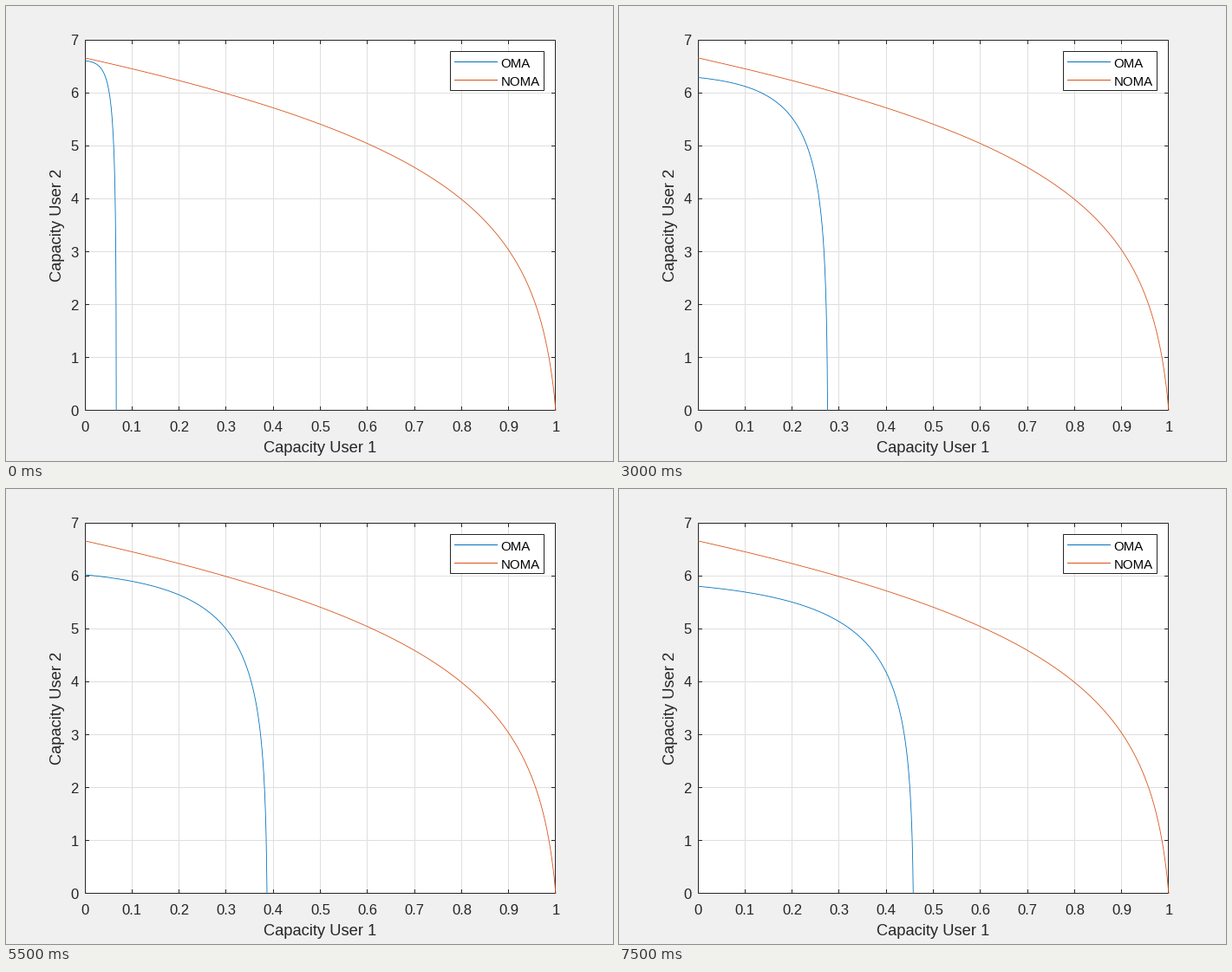
A matplotlib script that plays this animation: 700x525 px, repeating every 8000 ms.

```python
import matplotlib.pyplot as plt
import numpy as np
from matplotlib.animation import FuncAnimation
from matplotlib.patches import Rectangle

W, H, DPI = 700, 525, 100
FRAMES, INTERVAL = 16, 500
PX = 72 / DPI
INK, GRID, BLUE, ORANGE = "#262626", "#dfdfdf", "#0072bd", "#d95319"
LEFT, TOP, RIGHT, BOTTOM = 91, 39, 634, 467  # plot area in pixels
TICK = 5
G1, G2 = 1, 100  # channel gains of the two users

plt.rcParams["font.family"] = "Liberation Sans"
fig = plt.figure(figsize=(W / DPI, H / DPI), dpi=DPI, facecolor="#f0f0f0")
ax = fig.add_axes([0, 0, 1, 1])
ax.set(xlim=(0, W), ylim=(H, 0))
ax.axis("off")


def to_x(c):
    return LEFT + (RIGHT - LEFT) * c


def to_y(c):
    return BOTTOM - (BOTTOM - TOP) * c / 7


def pixel(v, last):
    """Centre of the pixel holding v, kept inside the plot area."""
    return min(np.floor(v), last - 1) + 0.5


def line(xs, ys, color=INK, z=3, width=1, **kw):
    return ax.plot(xs, ys, color=color, lw=width * PX, zorder=z, snap=False,
                   solid_capstyle="butt", **kw)[0]


def curve(xs, ys, color, z):
    return line(xs, ys, color, z, width=0.833)


def box(x0, y0, x1, y1, z):
    """White box with a one-pixel border inside the given edges."""
    ax.add_patch(Rectangle((x0 + 0.5, y0 + 0.5), x1 - x0 - 1, y1 - y0 - 1,
                           fc="white", ec=INK, lw=PX, zorder=z, snap=False,
                           joinstyle="miter"))


def text(x, y, s, px, color=INK, ha="center", **kw):
    ax.text(x, y, s, fontsize=px * PX, color=color, ha=ha, va="baseline",
            zorder=9, **kw)


def oma(alpha):
    b = np.linspace(0, 1, 1001)
    c1 = alpha * np.log2(1 + (1 - b) * G1 / alpha)
    c2 = (1 - alpha) * np.log2(1 + b * G2 / (1 - alpha))
    return to_x(c1), to_y(c2)


def noma():
    b = np.linspace(0, 1, 1001)
    c1 = np.log2(1 + (1 - b) * G1 / (b * G1 + 1))
    c2 = np.log2(1 + b * G2)
    return to_x(c1), to_y(c2)


box(LEFT, TOP, RIGHT, BOTTOM, 1)

for k in range(11):
    x = pixel(to_x(k / 10), RIGHT)
    if 0 < k < 10:
        line([x, x], [TOP + 1, BOTTOM - 1], GRID, 2)
        line([x, x], [BOTTOM, BOTTOM - TICK])
        line([x, x], [TOP, TOP + TICK])
    text(to_x(k / 10), 491, f"{k / 10:g}", 16.67)
for k in range(8):
    y = pixel(to_y(k), BOTTOM)
    if 0 < k < 7:
        line([LEFT + 1, RIGHT - 1], [y, y], GRID, 2)
        line([LEFT, LEFT + TICK], [y, y])
        line([RIGHT, RIGHT - TICK], [y, y])
    text(83.5, to_y(k) + 6, str(k), 16.67, ha="right")

text(362.5, 515, "Capacity User 1", 18.33)
text(64.5, 252.8, "Capacity User 2", 18.33, rotation=90,
     rotation_mode="anchor")

region = curve([], [], BLUE, 4)
curve(*noma(), ORANGE, 5)

box(512, 52, 621, 98, 6)
for y, name, color in ((64.5, "OMA", BLUE), (85.5, "NOMA", ORANGE)):
    line([517, 567], [y, y], color, 8)
    text(570.5, y + 6.5, name, 15, "black", "left")


def update(i):
    region.set_data(*oma((i + 1) / 100))
    return [region]


anim = FuncAnimation(fig, update, frames=FRAMES, interval=INTERVAL,
                     init_func=lambda: update(0), repeat=True, repeat_delay=0)
plt.show()
```
